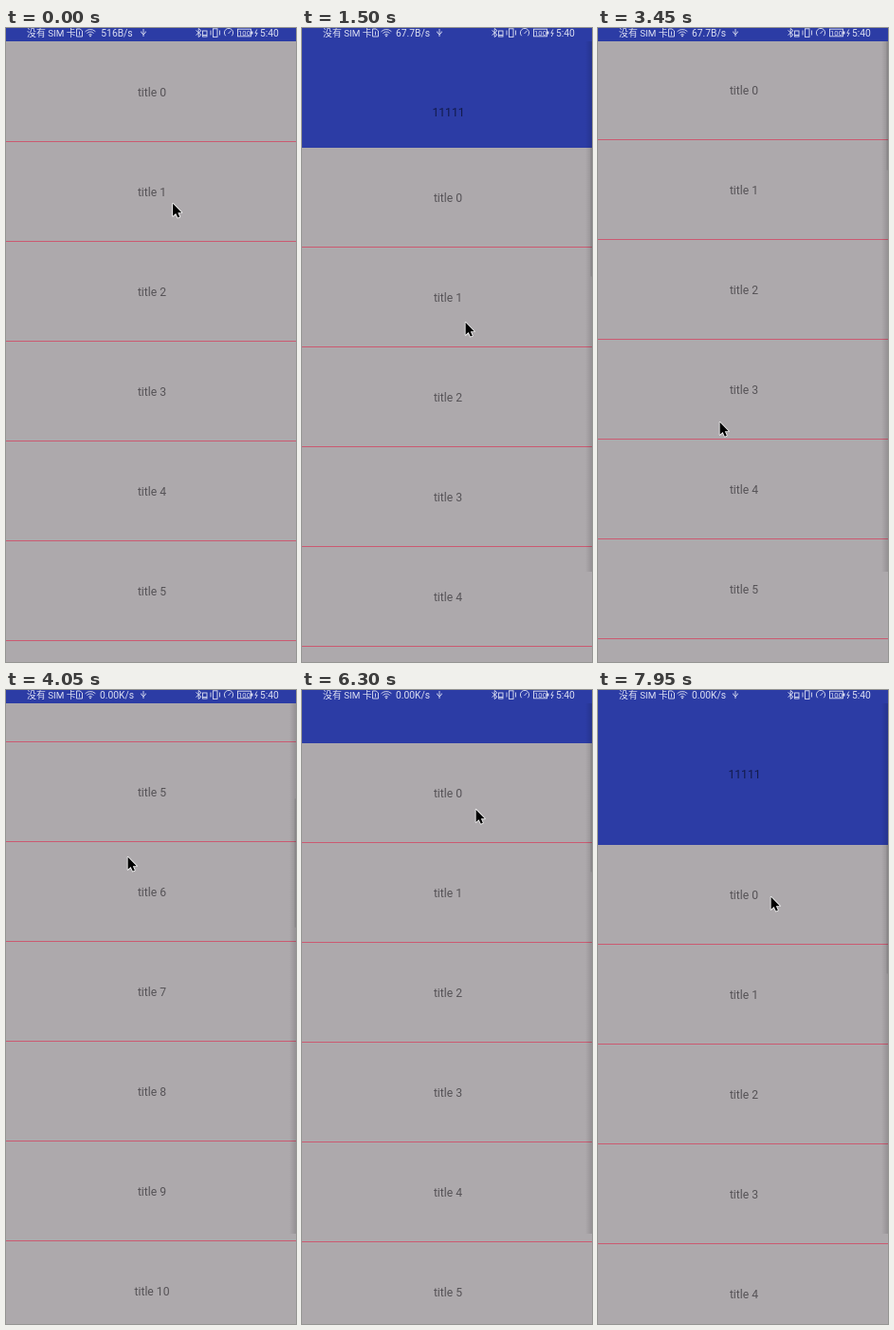
Animation, 306 px wide and 667 px high, one loop 8 s. Source, as an HTML page with a canvas:

```html
<!DOCTYPE html>
<html lang="zh">
<head>
<meta charset="utf-8">
<title>Collapsing list</title>
<style>
  html, body { margin: 0; width: 100%; height: 100%; overflow: hidden; background: #ada9ac; }
  canvas { display: block; width: 306px; height: 667px; }
</style>
</head>
<body>
<canvas id="stage"></canvas>
<script>
const W = 306, H = 667, LOOP = 8000, STEP = 150, TRAVEL = 100;
const BAR = 14, REST = 15, ROW = 105, ROWS = 30;
const BLUE = '#2c3ca5', GREY = '#ada9ac', PALE = '#dcdff2';

// Each swipe: start, end, list top reached, pointer x, pointer y at grab and drop
const swipes = [
  [750, 1650, 134, 172, 184, 318],
  [2045, 3000, REST, 165, 345, 261],
  [3425, 4050, -470, 128, 415, 175],
  [4200, 4950, -1215, 148, 340, 96],
  [5100, 5850, REST, 172, 130, 350],
  [6100, 6600, 134, 183, 84, 203],
  [6600, 7050, 20, 183, 203, 88],
  [7050, 7950, 163, 182, 88, 217]
];

const canvas = document.getElementById('stage');
const ctx = canvas.getContext('2d');
const dpr = window.devicePixelRatio || 1;
canvas.width = W * dpr;
canvas.height = H * dpr;

const mix = (a, b, u) => a + (b - a) * u;

function ease(t, start, end) {
  const u = Math.min(1, Math.max(0, (t - start) / (end - start)));
  return (1 - Math.cos(Math.PI * u)) / 2;
}

function pose(t) {
  let top = REST, x = 175.5, y = 184;
  for (const [start, end, to, grabX, grab, drop] of swipes) {
    const reach = ease(t, start - TRAVEL, start);
    const drag = ease(t, start, end);
    x = mix(x, grabX, reach);
    y = t < start ? mix(y, grab, reach) : mix(grab, drop, drag);
    top = mix(top, to, drag);
    if (t < end) break;
  }
  return { top: Math.round(top), x, y };
}

function rect(x, y, w, h, color) {
  ctx.fillStyle = color;
  ctx.fillRect(x, y, w, h);
}

function text(s, x, y, size, color, align = 'center') {
  ctx.font = `${size}px Roboto, "Noto Sans CJK SC", "Noto Sans CJK", sans-serif`;
  ctx.textAlign = align;
  ctx.fillStyle = color;
  ctx.fillText(s, x, y);
}

function line(...pts) {
  ctx.beginPath();
  for (let i = 0; i < pts.length; i += 2) ctx.lineTo(pts[i], pts[i + 1]);
  ctx.stroke();
}

function arc(x, y, r, from, to) {
  ctx.beginPath();
  ctx.arc(x, y, r, from * Math.PI, to * Math.PI);
  ctx.stroke();
}

function drawStatus(t) {
  const speed = t < 600 ? '516B/s' : t < 3600 ? '67.7B/s' : '0.00K/s';
  text('没有 SIM 卡', 22, 8.6, 9.9, PALE, 'left');
  text(speed, 117, 8.8, 10.3, PALE);
  text('5:40', 268, 8.8, 10.3, PALE, 'left');

  ctx.strokeStyle = PALE;
  ctx.lineWidth = 0.9;
  // SIM, wifi, USB
  line(74.5, 1, 78, 1, 80.5, 3, 80.5, 9, 74.5, 9, 74.5, 1);
  line(77.5, 3.5, 77.5, 7.5);
  for (const r of [2.5, 5, 7.5]) arc(89, 9, r, 1.24, 1.76);
  rect(88.2, 7.6, 1.6, 1.6, PALE);
  line(145, 1, 145, 9);
  line(142.8, 3.5, 142.8, 5, 145, 6.8, 147.2, 5, 147.2, 3.5);
  // Bluetooth, phone, vibrate, gauge, battery
  line(200.5, 2.5, 206, 7.2, 203.2, 9.5, 203.2, 0.5, 206, 2.8, 200.5, 7.5);
  ctx.strokeRect(207.5, 3, 4.5, 6);
  line(207.5, 7.5, 212, 7.5);
  ctx.strokeRect(218.5, 0.8, 4.5, 8.6);
  for (const x of [216, 225.5]) line(x, 2.5, x, 7.5);
  arc(235, 5, 4.6, 0.75, 2.25);
  line(234.5, 6, 237.5, 2.8);
  ctx.strokeRect(244.5, 1.2, 14, 7.6);
  rect(259, 3.5, 1.4, 3, PALE);
  text('100', 251.5, 7.9, 7.6, PALE);
  line(264.8, 1.5, 262.8, 5.3, 265.2, 5.3, 263.2, 9);
}

function drawList(top) {
  const edge = top > REST ? top : BAR;
  ctx.save();
  ctx.beginPath();
  ctx.rect(0, edge, W, H - edge);
  ctx.clip();
  rect(0, edge, W, H - edge, GREY);
  for (let i = 0; i < ROWS; i++) {
    const y = top + i * ROW;
    text('title ' + i, 154, y + 56.6, 12.2, '#565357');
    rect(0, y + ROW - 1, W, 1, '#cb5a71');
  }
  ctx.restore();
}

function drawScrollbar(top) {
  const view = H - BAR, ratio = view / (ROWS * ROW);
  const edge = Math.max(BAR, top);
  rect(W - 1.5, edge + (edge - top) * ratio, 1.5, view * ratio, 'rgba(60,58,62,.14)');
  const shade = ctx.createLinearGradient(W - 7, 0, W, 0);
  shade.addColorStop(0, 'rgba(0,0,0,0)');
  shade.addColorStop(1, 'rgba(0,0,0,.14)');
  rect(W - 7, BAR, 7, 558, shade);
}

function drawCursor(x, y) {
  ctx.save();
  ctx.translate(x + 0.6, y + 0.8);
  ctx.scale(0.84, 0.84);
  ctx.beginPath();
  ctx.moveTo(0, 0);
  ctx.lineTo(0, 15.5);
  ctx.lineTo(3.6, 12.2);
  ctx.lineTo(6.2, 17.6);
  ctx.lineTo(8.6, 16.5);
  ctx.lineTo(6.2, 11.2);
  ctx.lineTo(11, 11.2);
  ctx.closePath();
  ctx.lineJoin = 'round';
  ctx.lineWidth = 2;
  ctx.strokeStyle = '#f4f4f4';
  ctx.stroke();
  ctx.fillStyle = '#000';
  ctx.fill();
  ctx.restore();
}

function draw(now) {
  const t = Math.floor((now % LOOP) / STEP) * STEP;
  const { top, x, y } = pose(t);
  ctx.setTransform(dpr, 0, 0, dpr, 0, 0);
  rect(0, 0, W, H, BLUE);
  text('11111', 154.5, 93.3, 12.2, '#131b4c');
  drawList(top);
  drawStatus(t);
  if (t >= 300) drawScrollbar(top);
  drawCursor(x, y);
}

const start = performance.now();
function tick() {
  draw(performance.now() - start);
  requestAnimationFrame(tick);
}
tick();
</script>
</body>
</html>
```
